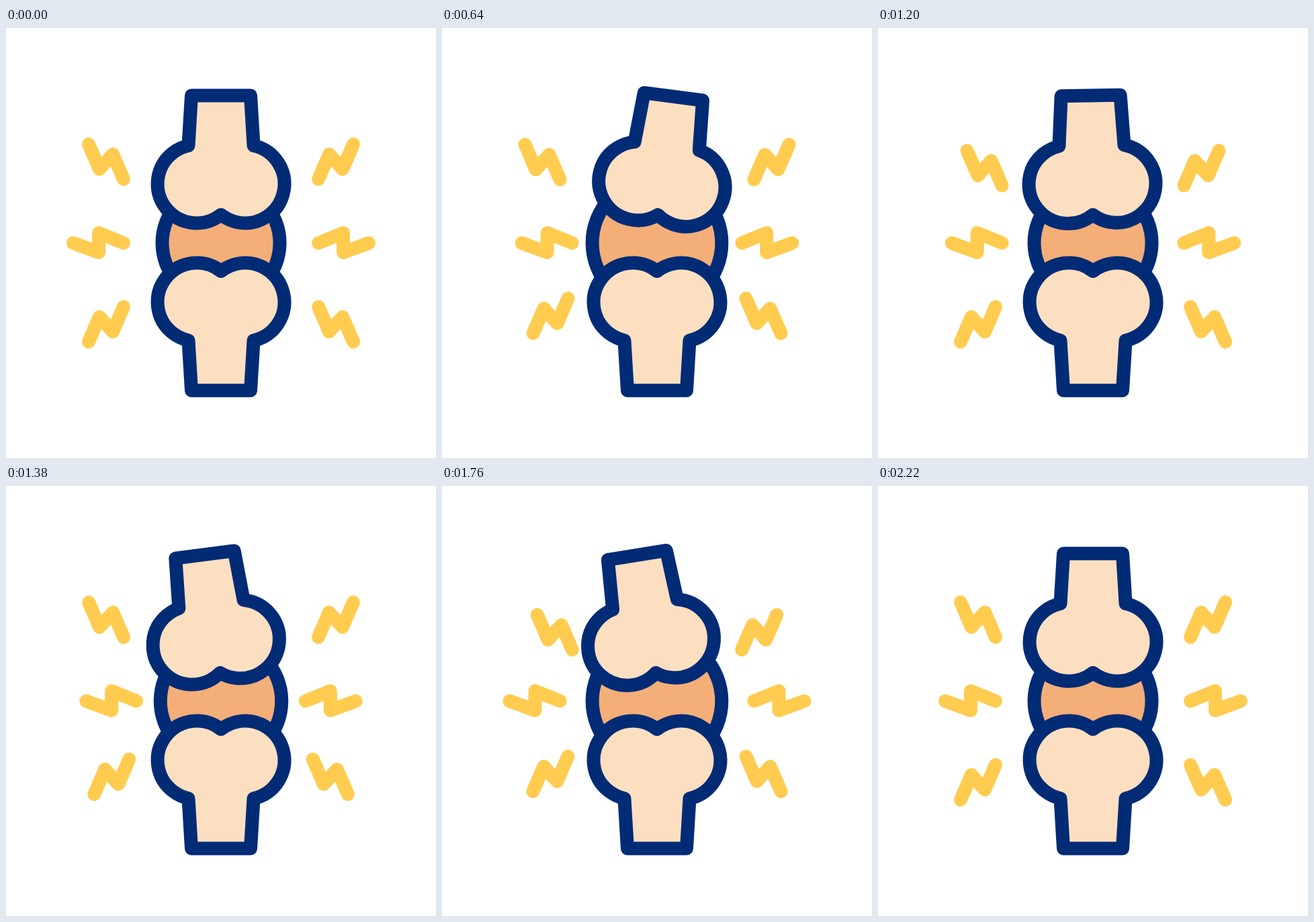
An HTML page with a canvas for the animation above (2400 ms loop, 640 px wide and 640 px high).

```html
<!DOCTYPE html>
<html>
<head>
<meta charset="utf-8">
<title>Joint pain</title>
<style>
html, body { margin: 0; width: 100%; height: 100%; overflow: hidden; background: #fff; }
canvas { display: block; width: 640px; height: 640px; }
</style>
</head>
<body>
<canvas id="stage" width="640" height="640"></canvas>
<script>
const ctx = document.getElementById('stage').getContext('2d');
const LOOP = 2400, MID = 320;
const NAVY = '#022b76', SKIN = '#fcdfc0', CARTILAGE = '#f4ae78', YELLOW = '#ffcc50';

const smooth = u => {
  u = Math.min(1, Math.max(0, u));
  return u * u * (3 - 2 * u);
};

// Two consecutive out-and-back pulses, at rest before and after.
function pulses(t, start, period) {
  const u = (t - start) / period;
  if (u <= 0 || u >= 2) return 0;
  return smooth(1 - Math.abs(2 * (u % 1) - 1));
}

// Eased interpolation through [time, value] keys.
function keyed(t, keys) {
  let value = keys[0][1];
  for (let i = 1; i < keys.length; i++) {
    const [t0, v0] = keys[i - 1], [t1, v1] = keys[i];
    if (t >= t0) value = v0 + (v1 - v0) * smooth((t - t0) / (t1 - t0));
  }
  return value;
}

const TILT = [[200, 0], [800, 9], [1600, -11], [2200, 0]];
const PIVOT_Y = 289;

function bonePath() {
  const p = new Path2D(), cy = 232, r = 58.4, dx = 36;
  const neck = Math.atan2(-57, 12.5), notch = Math.atan2(46, -dx);
  p.moveTo(276, 100.5);
  p.lineTo(364, 100.5);
  p.arc(MID + dx, cy, r, Math.PI - Math.atan2(57, 12.5) - Math.PI, notch);
  p.arc(MID - dx, cy, r, Math.PI - notch, Math.PI - neck);
  p.closePath();
  return p;
}

// The right knob's arc starts at the neck, up and to the right of its centre.
const BONE = bonePath();

function paint(path, fill) {
  ctx.fillStyle = fill;
  ctx.strokeStyle = NAVY;
  ctx.fill(path);
  ctx.stroke(path);
}

function upperBone(angle) {
  ctx.save();
  ctx.translate(MID, PIVOT_Y);
  ctx.rotate(angle * Math.PI / 180);
  ctx.translate(-MID, -PIVOT_Y);
  paint(BONE, SKIN);
  ctx.restore();
}

function lowerBone() {
  ctx.save();
  ctx.translate(0, 640);
  ctx.scale(1, -1);
  paint(BONE, SKIN);
  ctx.restore();
}

function disc(radius) {
  const p = new Path2D();
  p.arc(MID, MID, radius, 0, 2 * Math.PI);
  paint(p, CARTILAGE);
}

const DIAGONAL = [[123, 173], [139, 210], [159, 188], [175, 225]];
const LEVEL = [[100, 320], [138, 334], [138, 305], [175, 320]];

// Draws a bolt and its mirror image on the other side.
function boltPair(points, dx, dy, flipY) {
  ctx.strokeStyle = YELLOW;
  for (const mirror of [false, true]) {
    ctx.beginPath();
    for (const [px, py] of points) {
      const x = px + dx, y = py + dy;
      ctx.lineTo(mirror ? 640 - x : x, flipY ? 640 - y : y);
    }
    ctx.stroke();
  }
}

function draw(t) {
  ctx.fillStyle = '#fff';
  ctx.fillRect(0, 0, 640, 640);
  ctx.lineWidth = 20;
  ctx.lineCap = ctx.lineJoin = 'round';

  const shift = start => 19.3 * pulses(t, start, 800);
  const top = shift(600), low = shift(400);
  boltPair(DIAGONAL, top, top, false);
  boltPair(LEVEL, shift(200), 0, false);
  boltPair(DIAGONAL, low, low, true);

  disc(87.5 + 9.2 * pulses(t, 200, 1000));
  upperBone(keyed(t, TILT));
  lowerBone();
}

function tick() {
  draw(performance.now() % LOOP);
  requestAnimationFrame(tick);
}
tick();
</script>
</body>
</html>
```
